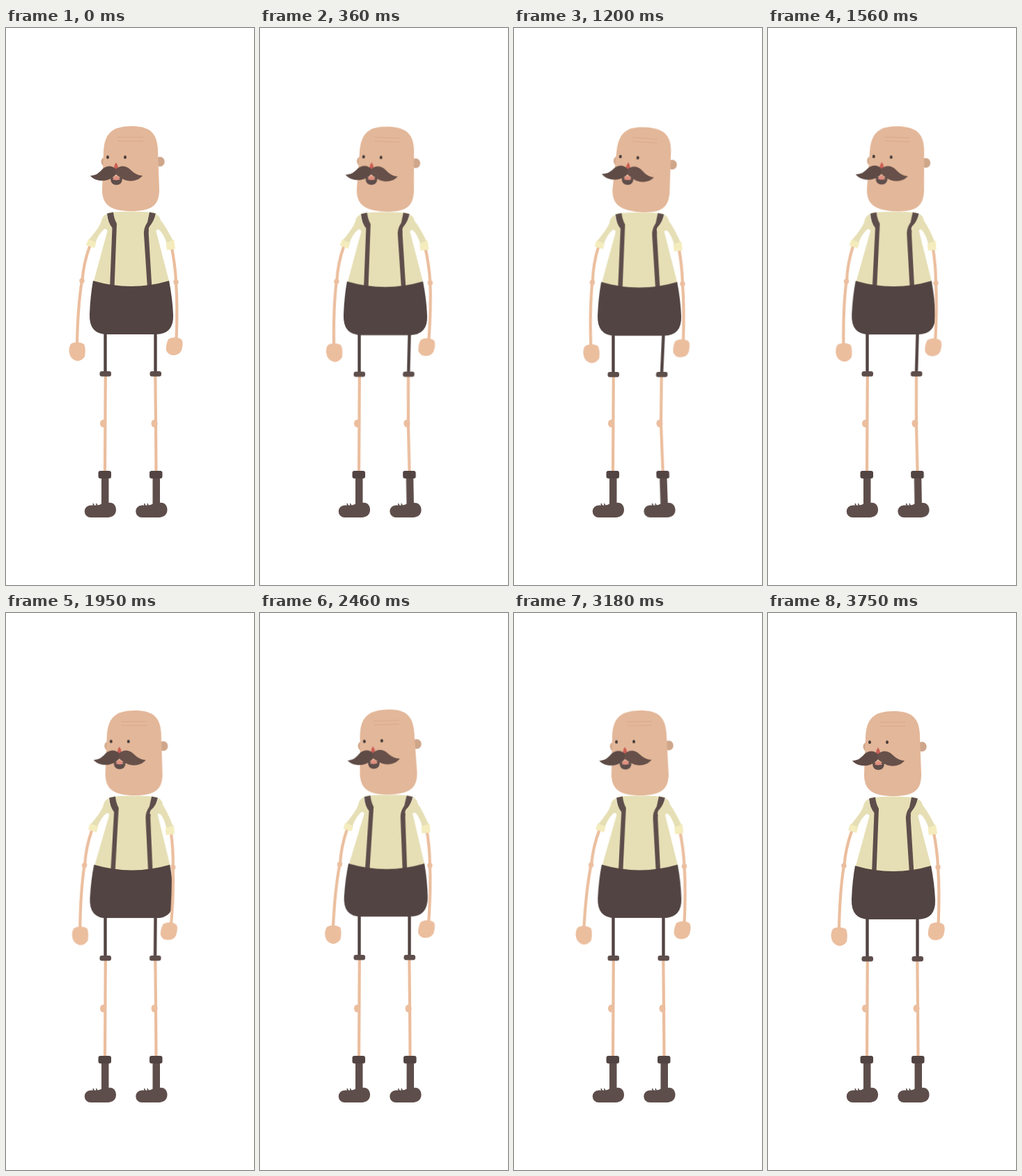
An HTML page without scripts for the animation above (3.78 s loop, 356 by 800 pixels).

```html
<!DOCTYPE html>
<html lang="en">
<head>
<meta charset="utf-8">
<title>Idle moustache man</title>
<style>
html, body { margin: 0; width: 100%; height: 100%; overflow: hidden; background: #fff; }
svg { display: block; width: 356px; height: 800px; }

.joint { animation: 3780ms linear infinite; }
.head { animation-name: head; transform-origin: 180px 263px; }
.torso { animation-name: torso; transform-origin: 180px 440px; }
.sleeve-l { animation-name: sleeve-l; transform-origin: 141px 278px; }
.upper-l { animation-name: upper-l; transform-origin: 121px 311px; }
.fore-l { animation-name: fore-l; transform-origin: 109px 363px; }
.sleeve-r { animation-name: sleeve-r; transform-origin: 219px 278px; }
.upper-r { animation-name: upper-r; transform-origin: 237px 311px; }
.fore-r { animation-name: fore-r; transform-origin: 244px 365px; }
.thigh-l { animation-name: thigh-l; }
.thigh-r { animation-name: thigh-r; transform-origin: 214px 440px; }
.shin-r { animation-name: shin-r; transform-origin: 215px 690px; }
.knee-r { animation-name: knee-r; transform-origin: 215px 568px; }

@keyframes head {
  from, 99.2%, to { transform: translate(0, 0) rotate(0deg); }
  17.5% { transform: translate(-.5px, 1.2px) rotate(4deg); }
  31.7% { transform: translate(1.3px, 1.3px) rotate(4deg); }
  51.6% { transform: translate(4.5px, -1px) rotate(.2deg); }
  65.1% { transform: translate(6.5px, -2.4px) rotate(-2deg); }
  84.1% { transform: translate(2.4px, -1px) rotate(-1deg); }
}
@keyframes torso {
  from, 99.2%, to { transform: translateY(0) skewX(0deg) scaleY(1); }
  17.5% { transform: translateY(2px) skewX(.15deg) scaleY(1.004); }
  31.7% { transform: translateY(2px) skewX(-.15deg) scaleY(1.004); }
  51.6% { transform: translateY(-1.7px) skewX(-1deg) scaleY(.996); }
  65.1% { transform: translateY(-3.8px) skewX(-1.5deg) scaleY(.992); }
  84.1% { transform: translateY(-2px) skewX(-.65deg) scaleY(.995); }
}
@keyframes sleeve-l {
  from, 17.5%, 99.2%, to { transform: rotate(0deg); }
  31.7% { transform: rotate(-.5deg); }
  51.6% { transform: rotate(-1deg); }
  65.1% { transform: rotate(-2deg); }
  84.1% { transform: rotate(-1.2deg); }
}
@keyframes upper-l {
  from, 99.2%, to { transform: rotate(0deg); }
  17.5% { transform: rotate(-1.8deg); }
  31.7% { transform: rotate(-2.7deg); }
  51.6% { transform: rotate(-.9deg); }
  65.1% { transform: rotate(-.6deg); }
  84.1% { transform: rotate(1.1deg); }
}
@keyframes fore-l {
  from, 99.2%, to { transform: rotate(0deg); }
  17.5% { transform: rotate(-1.9deg); }
  31.7% { transform: rotate(-.1deg); }
  51.6% { transform: rotate(.5deg); }
  65.1% { transform: rotate(2.7deg); }
  84.1% { transform: rotate(1.5deg); }
}
@keyframes sleeve-r {
  from, 99.2%, to { transform: rotate(0deg); }
  17.5% { transform: rotate(1.1deg); }
  31.7% { transform: rotate(2.2deg); }
  51.6% { transform: rotate(4.9deg); }
  65.1% { transform: rotate(2.4deg); }
  84.1% { transform: rotate(1.6deg); }
}
@keyframes upper-r {
  from, 99.2%, to { transform: rotate(0deg); }
  17.5% { transform: rotate(-2.6deg); }
  31.7% { transform: rotate(-1.2deg); }
  51.6% { transform: rotate(-2.1deg); }
  65.1% { transform: rotate(-1.7deg); }
  84.1% { transform: rotate(-2.2deg); }
}
@keyframes fore-r {
  from, 99.2%, to { transform: rotate(0deg); }
  17.5% { transform: rotate(4.9deg); }
  31.7% { transform: rotate(-1.5deg); }
  51.6% { transform: rotate(-1.6deg); }
  65.1% { transform: rotate(-.6deg); }
  84.1% { transform: rotate(.3deg); }
}
@keyframes thigh-l {
  from, 99.2%, to { transform: translateY(0); }
  17.5%, 31.7% { transform: translateY(1px); }
  51.6%, 84.1% { transform: translateY(-1px); }
  65.1% { transform: translateY(-2px); }
}
@keyframes thigh-r {
  from, 99.2%, to { transform: translateY(0) skewX(0deg); }
  17.5%, 31.7% { transform: translateY(1px) skewX(-2.6deg); }
  51.6% { transform: translateY(-1px) skewX(-.5deg); }
  65.1% { transform: translateY(-2px) skewX(0deg); }
  84.1% { transform: translateY(-1px) skewX(0deg); }
}
@keyframes shin-r {
  from, 51.6%, 99.2%, to { transform: skewX(0deg); }
  17.5%, 31.7% { transform: skewX(1.9deg); }
}
@keyframes knee-r {
  from, 51.6%, 99.2%, to { transform: skewX(0deg); }
  17.5%, 31.7% { transform: skewX(-3.1deg); }
}

.skin { fill: #ebbe9e; }
.limb { fill: none; stroke: #ebbe9e; stroke-width: 4.2; }
.shirt { fill: #e6dfb5; }
.cuff { fill: #f4ecbd; }
.dark { fill: #524442; }
.brown { fill: #5e4e4b; }
.trouser { stroke: #524442; stroke-width: 4.4; }
</style>
</head>
<body>
<svg viewBox="0 0 356 800">
  <defs>
    <g id="boot">
      <path class="brown" d="M137 642H147.5V682C154 681 158 686 158 692C158 699 153 702.5 146 703H121.500A8.7 8.700 0 0 1 121.500 685.500H130Q134 685.500 137 683.500Z"/>
      <path d="M125 683l1.500 4M129.500 683l1.500 4" stroke="#524442" stroke-width="1.500"/>
      <rect class="dark" x="132.500" y="636" width="18.500" height="11" rx="3"/>
    </g>
    <g id="thigh">
      <path class="trouser" d="M142.500 428V495"/>
      <rect class="brown" x="134.500" y="493" width="16.500" height="7.500" rx="3"/>
    </g>
  </defs>

  <!-- legs -->
  <path class="limb" d="M142.800 496L142 640"/>
  <ellipse class="skin" cx="139.500" cy="568" rx="4.500" ry="5.500"/>
  <use href="#boot"/>
  <g class="joint thigh-l"><use href="#thigh"/></g>

  <g class="joint shin-r">
    <path class="limb" d="M215 567L215.500 640"/>
    <g class="joint knee-r"><path class="limb" d="M214.300 496L215 568"/></g>
    <ellipse class="skin" cx="213" cy="568" rx="4.500" ry="5.500"/>
    <use href="#boot" x="73.500"/>
  </g>
  <g class="joint thigh-r"><use href="#thigh" x="72"/></g>

  <g class="joint torso">
    <path class="shirt" d="M147 265Q180 262 213 265L215 290L235 367Q180 385 125 367L146 290Z"/>
    <path class="brown" d="M145 266.500L154 264.500Q155 274 159 281L155.500 374H149L152.500 287Q146 279 145 266.500Z"/>
    <path class="brown" d="M206 264.500L215 266.500Q213 276 207 284Q204 289 205 300L209.500 374H203L198 297Q197 288 203 279Z"/>
    <path class="dark" d="M125 363Q180 379 234 363Q239 388 240 412Q241 440 215 440H145Q119 440 120 411Q121 385 125 363Z"/>

    <g class="joint sleeve-l">
      <g class="joint upper-l">
        <path class="limb" d="M121 311Q111 338 109.500 363"/>
        <g class="joint fore-l">
          <path class="limb" d="M109 363Q103 400 102 454"/>
          <path class="skin" d="M94 453Q103 449 112 454Q115 460 113 472Q108 479 101 478Q91 475 90.500 464Q90.500 456 94 453Z"/>
        </g>
        <circle class="skin" cx="109" cy="363" r="3.700"/>
      </g>
      <path class="shirt" d="M145 267Q138 270 137 277Q135 285 119 304L128 309Q134 294 141 289Q144 287 146 292L151 287Q146 280 145 267Z"/>
      <path class="cuff" d="M118 303L129.500 308L127 316L115 312Z"/>
    </g>

    <g class="joint sleeve-r">
      <g class="joint upper-r">
        <path class="limb" d="M237 311Q243 340 244 365"/>
        <g class="joint fore-r">
          <path class="limb" d="M244 365Q246.500 400 244.500 448"/>
          <path class="skin" d="M250 446Q241 442 233 447Q229 455 230 463Q233 470 240 470Q249 470 252 463Q255 453 252.500 448Z"/>
        </g>
        <circle class="skin" cx="244" cy="365" r="3.700"/>
      </g>
      <path class="shirt" d="M215 267Q221 270 222 276Q230 286 240 306L231 310Q226 295 220 290Q217 288 215 292L205 291Q204 286 208 283Q213 277 215 267Z"/>
      <path class="cuff" d="M241 304L229.500 309L231 319L243 317Z"/>
    </g>
  </g>

  <g class="joint head">
    <ellipse cx="141" cy="192" rx="4.500" ry="6" fill="#d3a98d"/>
    <ellipse cx="221" cy="192" rx="6.700" ry="7" fill="#cfa68a"/>
    <path fill="#e3b799" d="M180 141C206 141 217 150 218 176L220 232C220 254 210 263 180 263C150 263 138 254 138 232L140 178C141 152 152 141 180 141Z"/>
    <path d="M160 157H197M161 162.500H197" stroke="#d8a88d"/>
    <g fill="#493e3c">
      <ellipse cx="146" cy="185.500" rx="2" ry="2.600"/>
      <ellipse cx="171" cy="185.500" rx="2" ry="2.600"/>
    </g>
    <path fill="#cc5f55" d="M158 193Q161 197 161 201Q160 205 158 205Q155 205 155 201Q155 197 158 193Z"/>
    <path class="brown" d="M150 215H167Q167 225.500 158.500 225.500Q150 225.500 150 215Z"/>
    <path fill="#e08f80" d="M153 217.500Q158 208 164 217.500Q158 219.500 153 217.500Z"/>
    <path fill="#5f4b46" d="M158 203C153 197 144 197 138 203C132 210 127 212 121 212C127 220 140 221 149 217Q155 214 158 210Z"/>
    <path fill="#675049" d="M157.500 203V210Q162 214 168 217C177 222 190 220 196 212C190 212 184 209 178 203C172 197 163 197 157.500 203Z"/>
  </g>
</svg>
</body>
</html>
```
